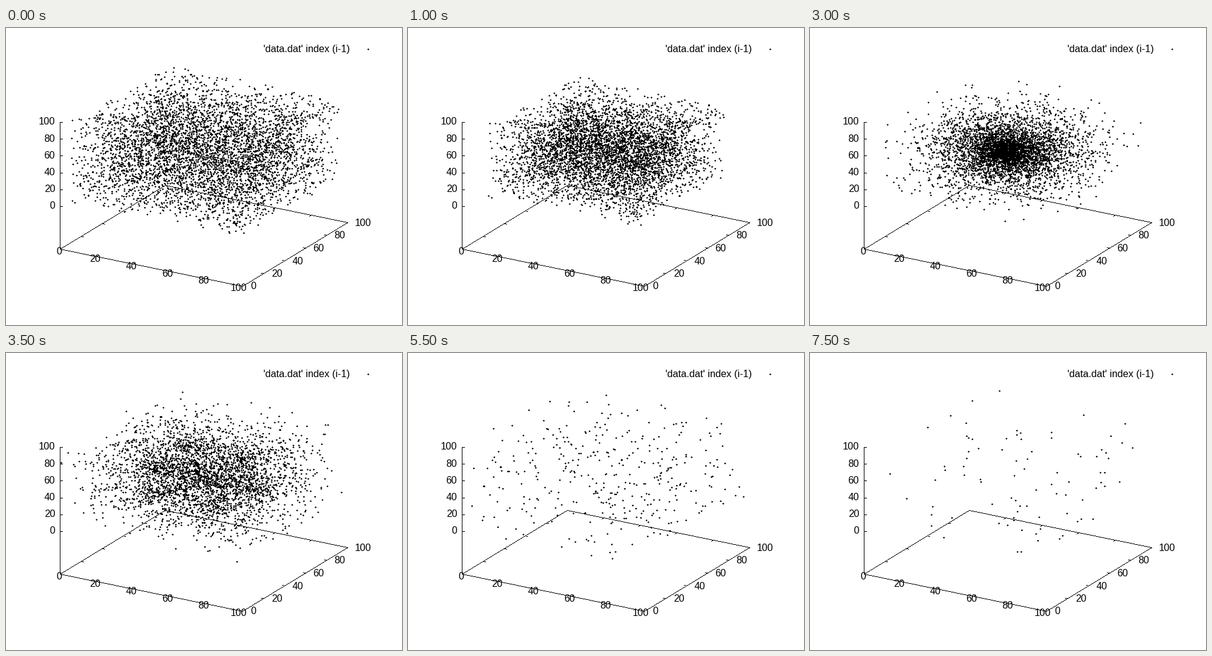
A matplotlib script that plays this animation: 640 by 480 pixels, repeating every 8 s.

```python
import numpy as np
import matplotlib.pyplot as plt
from matplotlib.animation import FuncAnimation

W, H, DPI = 640, 480, 100
FRAMES, STEP = 16, 500
COUNT = 4900
LEAD = 1.1  # seconds of collapse before the loop begins
PX = 72 / DPI  # points per pixel

plt.rcParams["font.family"] = "Liberation Sans"
fig = plt.figure(figsize=(W / DPI, H / DPI), dpi=DPI, facecolor="white")
ax = fig.add_axes([0, 0, 1, 1])
ax.axis("off")
paper = np.ones((H, W))


def project(x, y, z):
    """Data coordinates (0..100) to stage pixels."""
    return 87 + 2.95 * x + 1.70 * y, 288 + 0.60 * x - 1.03 * y - 1.36 * z


def base(x, y):
    px, py = project(x, y, 0)
    return px, py + 69


def line(a, b):
    """One-pixel line without smoothing."""
    n = int(max(abs(b[0] - a[0]), abs(b[1] - a[1]))) + 1
    xs = np.rint(np.linspace(a[0], b[0], n)).astype(int)
    ys = np.rint(np.linspace(a[1], b[1], n)).astype(int)
    paper[ys, xs] = 0


def tick(x, y, dx, dy):
    px, py = base(x, y)
    line((px, py), (px + dx, py + dy))


def text(x, y, s, ha):
    ax.text(x - 1, y, s, ha=ha, va="baseline", fontsize=16 * PX,
            color="black", zorder=3)


def draw_axes():
    corners = [base(0, 0), base(100, 0), base(100, 100), base(0, 100)]
    for a, b in zip(corners, corners[1:] + corners[:1]):
        line(a, b)
    line(corners[0], (87, 152))
    for i in range(6):
        v = 20 * i
        z = 288 - 1.36 * v
        line((87, z), (91, z))
        text(80, z + 4, str(v), "right")
        text(86 + 58.5 * i - (2 if i == 5 else 0), 366 + 11.7 * i, str(v), "center")
        text(396 + 33.6 * i, 422 - 20.5 * i, str(v), "left")
        tick(v, 0, 3.4, -2.1)
        tick(v, 100, -3.4, 2.1)
        tick(0, v, 4, 0.8)
        tick(100, v, -4, -0.8)
    text(416, 38, "'data.dat' index (i-1)", "left")


def smoothstep(x, lo, hi):
    x = np.clip((x - lo) / (hi - lo), 0, 1)
    return x * x * (3 - 2 * x)


# Cold cube of particles: falls inward, passes the centre, flies apart.
# Corner matter arrives late and leaves as eight streams.
rng = np.random.default_rng(7)
start = rng.uniform(-1, 1, (COUNT, 3))
radius = np.linalg.norm(start, axis=1)
outer = np.clip((radius - 0.7) / 1.03, 0, 1)
fall = 3.25 + 1.25 * outer ** 1.3 + rng.normal(0, 0.06, COUNT)
early = rng.random(COUNT) < 0.015
fall -= early * rng.uniform(0.3, 0.8, COUNT)
stream = smoothstep(np.abs(start).min(axis=1), 0.38, 0.52)[:, None]
miss = rng.normal(0, 0.08, (COUNT, 3))
jet = -0.8 * np.sign(start) / (4.5 + LEAD - fall)[:, None]
speed = (1 - stream) * rng.normal(0, 0.56, (COUNT, 3)) + stream * (
    jet + rng.normal(0, 0.06, (COUNT, 3)))


def positions(t):
    age = t + LEAD
    s = (1 - np.minimum(age / fall, 1) ** 2)[:, None] ** 0.62
    after = np.maximum(age - fall, 0)[:, None]
    return s * start + (1 - s) * miss + speed * after


def stamp(img, px, py):
    """Each point is a plus three pixels wide."""
    cx, cy = np.rint(px).astype(int), np.rint(py).astype(int)
    for dx, dy in ((0, 0), (1, 0), (-1, 0), (0, 1), (0, -1)):
        img[cy + dy, cx + dx] = 0


def render(t):
    p = positions(t)
    p = 50 + 50 * p[np.all(np.abs(p) <= 1, axis=1)]
    img = paper.copy()
    stamp(img, *project(*p.T))
    return img


draw_axes()
stamp(paper, 585, 34)
cloud = ax.imshow(render(0), cmap="gray", vmin=0, vmax=1,
                  interpolation="nearest", aspect="auto", zorder=1)
ax.set_xlim(-0.5, W - 0.5)
ax.set_ylim(H - 0.5, -0.5)


def update(i):
    cloud.set_data(render(i * STEP / 1000))
    return (cloud,)


anim = FuncAnimation(fig, update, frames=FRAMES, interval=STEP,
                     repeat=True, repeat_delay=0)
plt.show()
```
